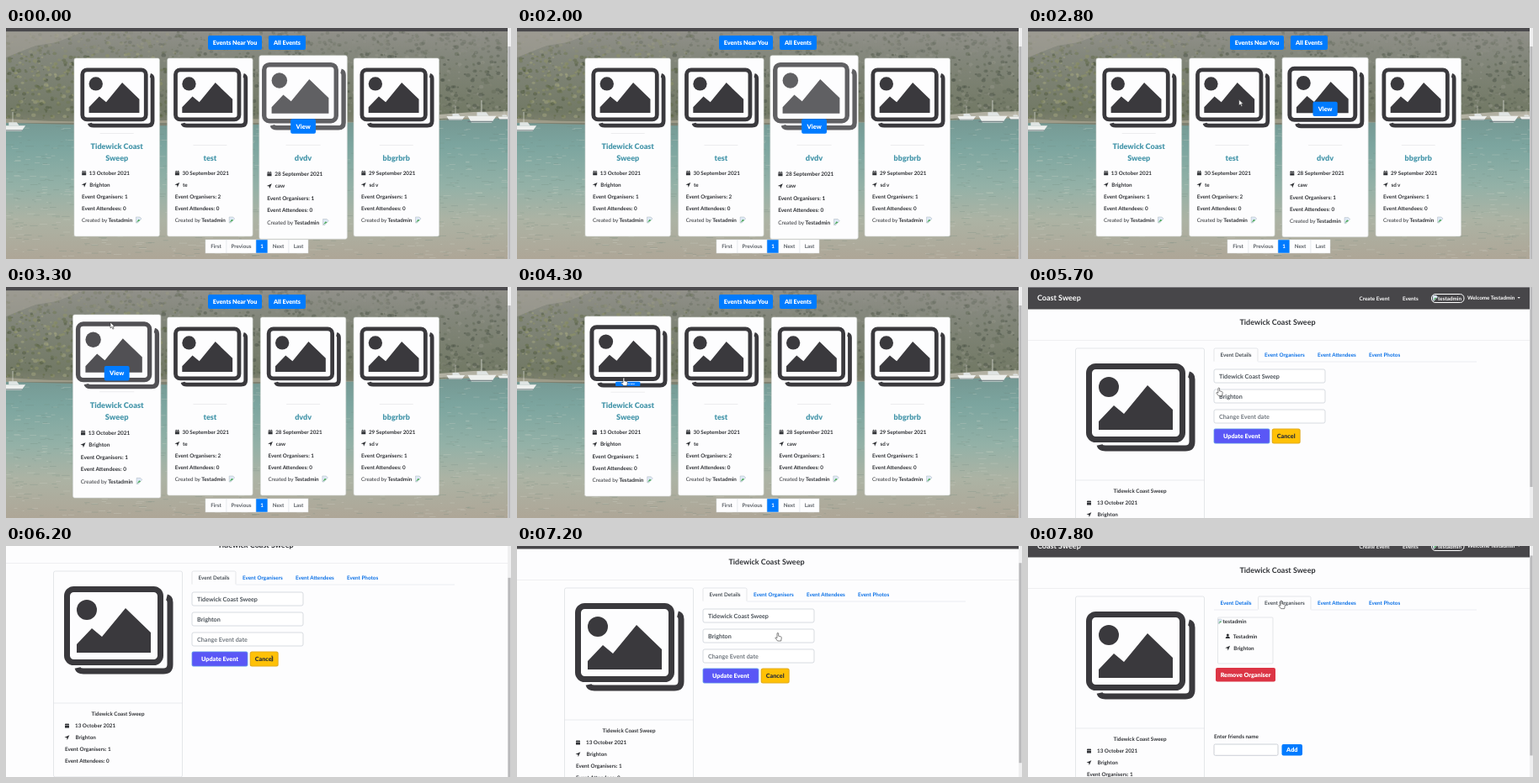
An HTML page for the animation above (8 s loop, 600 px wide and 275 px high).

```html
<!DOCTYPE html>
<html lang="en">
<head>
<meta charset="utf-8">
<title>Event listing</title>
<style>
html, body { margin: 0; width: 100%; height: 100%; overflow: hidden; background: #fdfdfe; }
svg { display: block; width: 600px; height: 275px; }
text { font-family: Lato, sans-serif; font-weight: 700; font-size: 6.3px; fill: #2f3135; text-rendering: geometricPrecision; }
.mid { font-size: 7.2px; }
.big { font-size: 9px; }
</style>
</head>
<body>
<svg id="stage" viewBox="0 0 600 275" xmlns="http://www.w3.org/2000/svg">
  <defs>
    <linearGradient id="hill" x2="0" y2="1">
      <stop offset="0" stop-color="#92918b"/><stop offset=".3" stop-color="#82867a"/>
      <stop offset=".8" stop-color="#727965"/><stop offset="1" stop-color="#88887a"/>
    </linearGradient>
    <linearGradient id="sea" x2="0" y2="1">
      <stop offset="0" stop-color="#759792"/><stop offset=".2" stop-color="#7ca59f"/>
      <stop offset=".48" stop-color="#93b1a7"/><stop offset=".72" stop-color="#acb3a4"/>
      <stop offset="1" stop-color="#aea697"/>
    </linearGradient>
    <g id="picture" fill="none" stroke="#3a393d" stroke-width="7">
      <path d="M122 13q4 1 4 6V93q0 8-8 8H23q-6 0-7-4"/>
      <rect x="3.5" y="3.5" width="111" height="87" rx="8"/>
      <g fill="#3a393d" stroke="none">
        <circle cx="27" cy="28" r="12"/>
        <path d="M15 79V69L33 50l12 10 28-34 30 29v24z"/>
      </g>
    </g>
    <g id="calendar" fill="#2f3135">
      <path d="M-2.5-1.9h5v1h-5zM-2.5-.4h5v3h-5zM-1.6-2.9h.9v1.2h-.9zM.7-2.9h.9v1.2H.7z"/>
    </g>
    <path id="arrow" d="M2.8-2.8L.3 3-.3.3-3-.2z" fill="#2f3135"/>
    <g id="person" fill="#2f3135"><circle cy="-1.4" r="1.5"/><path d="M-2.6 2.8q0-2.6 2.6-2.6t2.6 2.6z"/></g>
    <g id="broken">
      <path d="M0 0h4.5l2 2-2.5 2.5L2 7H0z" fill="#dfe9f6" stroke="#a9b4bd" stroke-width=".5"/>
      <path d="M.4 6.4L3 2.7 5 4z" fill="#4caa58"/>
    </g>
  </defs>
  <g id="listing"></g>
  <g id="detail"></g>
  <g id="bar"><rect x="596" width="4" height="275" fill="#efeff0"/><rect id="thumb" x="596.4" width="3.2" height="275" fill="#b9b9bb"/></g>
  <g id="cursor" stroke="#333" stroke-width=".6" fill="#fff">
    <path id="pointer" d="M0 0v7l1.7-1.5 1.2 2.6 1.2-.6-1.2-2.5h2.2z"/>
    <path id="hand" d="M-1-4.5q1-1 1.7 0v3.3l3 .8q.7.3.6 1.2L3.7 4.6H-.4L-3 1.3q0-1 1-.9l1 .8z"/>
    <path id="beam" d="M-1-3h2M0-3v6M-1 3h2" fill="none"/>
  </g>
</svg>
<script>
const EVENT = "Tidewick Coast Sweep", BRAND = "Coast Sweep", USER = "Testadmin";
const PLACE = "Brighton", DURATION = 8000, FRAME = 100;
const $ = id => document.getElementById(id);

const text = (x, y, s, attrs = "") => `<text x="${x}" y="${y}" ${attrs}>${s}</text>`;
const centred = (x, y, s, attrs = "") => text(x, y, s, `text-anchor="middle" ${attrs}`);
const rect = (x, y, w, h, fill, attrs = "") =>
  `<rect x="${x}" y="${y}" width="${w}" height="${h}" fill="${fill}" ${attrs}/>`;
const use = (id, x, y, scale = 1) => `<use href="#${id}" transform="translate(${x} ${y}) scale(${scale})"/>`;
const button = (x, y, w, h, fill, label, ink = "#fff") =>
  rect(x, y, w, h, fill, 'rx="2"') +
  centred(x + w / 2, y + h / 2 + 2.6, label, `class="mid" style="fill:${ink};font-weight:900"`);

function randomiser(seed) {
  return () => (seed = (seed * 16807) % 2147483647) / 2147483647;
}

function landscape() {
  const rnd = randomiser(77);
  const sunny = ["#5f6948", "#8f9366", "#6f7853", "#a3a580", "#4f5a3f"];
  const shaded = ["#565e50", "#7f8474", "#646c5a", "#93958a", "#4b5347"];
  let out = rect(0, 0, 600, 125, "url(#hill)");
  for (let i = 0; i < 2200; i++) {
    const x = rnd() * 600, y = 4 + rnd() * 104, r = .8 + rnd() * 2;
    const palette = x < 140 + rnd() * 120 ? sunny : shaded;
    const alpha = y < 30 ? .25 : .5;
    out += `<ellipse cx="${x.toFixed(1)}" cy="${y.toFixed(1)}" rx="${r.toFixed(1)}" ry="${(r * .8).toFixed(1)}" fill="${palette[i % 5]}" opacity="${alpha}"/>`;
  }
  out += '<path d="M0 5h90l-30 12-25 4-35 14z" fill="#aaa69b" opacity=".5"/>';
  out += '<path d="M0 108q80 6 190 2t200 1 210-10v12H0z" fill="#a5a18f" opacity=".85"/>';
  out += '<path d="M0 113q150 5 300 2t300-8v168H0z" fill="url(#sea)"/>';
  out += '<path d="M515 103l40-3 45-1v6l-85 3z" fill="#c2bfb2" opacity=".8"/>';
  for (let i = 0; i < 1100; i++) {
    const y = 116 + rnd() * 158, x = rnd() * 600, w = 2 + rnd() * 8;
    out += rect(x.toFixed(1), y.toFixed(1), w.toFixed(1), .8, i % 2 ? "#d3d8cc" : "#6f857c", 'opacity=".3"');
  }
  const boat = (x, y, s) => `<g transform="translate(${x} ${y}) scale(${s})">
    <path d="M-15-3H16L11 4h-22z" fill="#eef0ee"/><path d="M-15 3H12" stroke="#667479"/>
    <path d="M-5-3v-4H5l3 4z" fill="#dfe4e3"/><path d="M0-5v-15" stroke="#dedfd8" stroke-width=".7"/></g>`;
  return out + boat(565, 108, 1.1) + boat(534, 107, .7) + boat(592, 107, .5) + boat(8, 119, .95);
}

const cards = [
  [EVENT, "13 October 2021", PLACE, 1],
  ["test", "30 September 2021", "te", 2],
  ["dvdv", "28 September 2021", "caw", 1],
  ["bbgrbrb", "29 September 2021", "sd v", 1]
];

function card([name, date, place, organisers], i) {
  const x = 81 + i * 110.7, mid = x + 50.7;
  const title = 'class="big" style="fill:#4797ab;font-weight:900"';
  const words = name.split(" "), last = words.pop();
  return `<g id="card${i}">` +
    rect(x, 36, 101.4, 212, "#fdfdfe", 'rx="2" stroke="#d4d8d6" stroke-width=".6"') +
    `<g id="image${i}">${use("picture", x + 7.4, 47.4, .68)}</g>` +
    rect(mid - 20, words.length ? 125 : 139, 40, .6, "#e2e2e4") +
    centred(mid, 143.5, words.join(" "), title) + centred(mid, 157.5, last, title) +
    use("calendar", x + 11.7, 172.7) + text(x + 17.8, 175, date) +
    use("arrow", x + 11.7, 186.8) + text(x + 18.3, 189, place) +
    text(x + 9, 203.2, "Event Organisers: " + organisers) +
    text(x + 9, 217.2, "Event Attendees: 0") +
    text(x + 9, 231.2, `<tspan style="font-weight:400">Created by</tspan> ${USER}`) +
    use("broken", x + 73.5, 225) +
    `<g id="view${i}">${button(mid - 14.5, 109.2, 29, 17, "#007bff", "View")}</g></g>`;
}

function pagination() {
  const edges = [237, 262, 297, 311, 336, 359];
  return ["First", "Previous", "1", "Next", "Last"].map((label, i) => {
    const x = edges[i], w = edges[i + 1] - x, on = i === 2;
    return rect(x, 252, w, 16, on ? "#007bff" : "#fdfdfe", 'stroke="#dee2e6" stroke-width=".5"') +
      centred(x + w / 2, 262.4, label, `style="fill:${on ? "#fff" : "#5b6066"}"`);
  }).join("");
}

$("listing").innerHTML = landscape() + rect(0, 0, 600, 4, "#4b4a4d") +
  button(240, 9, 64, 17, "#007bff", "Events Near You") +
  button(312, 9, 44, 17, "#007bff", "All Events") +
  cards.map(card).join("") + pagination();

const white = 'style="fill:#fff"';
const navbar = rect(0, 0, 600, 26.5, "#474649") + rect(0, 0, 600, .8, "#8a898c") +
  text(11, 16, BRAND, `class="big" ${white}`) +
  text(393.5, 15.5, "Create Event", white) + text(445, 15.5, "Events", white) +
  rect(479.5, 8.5, 38.5, 10, "none", 'rx="4.5" stroke="#fff"') +
  use("broken", 481, 10, .9) + text(487, 15.5, USER.toLowerCase(), white) +
  text(522, 15.2, "Welcome " + USER, white) + '<path d="M581.5 12h3.4l-1.7 1.8z" fill="#fff"/>';

const line = 'stroke="#d9dce0" stroke-width=".7"';
const summary = centred(296.5, 45.3, EVENT, 'class="big"') + rect(0, 63.3, 596, .6, "#e6e6e9") +
  rect(56.5, 73, 153, 245, "none", `rx="2" ${line}`) + rect(56.5, 229.7, 153, .6, "#d9dce0") +
  use("picture", 69, 91) + centred(133, 244.8, EVENT) +
  use("calendar", 72.5, 257) + text(82, 259.3, "13 October 2021") +
  use("arrow", 72.5, 271) + text(82.5, 273.3, PLACE) +
  text(70, 287.3, "Event Organisers: 1") + text(70, 301.3, "Event Attendees: 0");

const tabs = [["Details", 228.5], ["Organisers", 281], ["Attendees", 344], ["Photos", 405]];
function tabRow(active) {
  const [x, w] = [[221, 52], [273.5, 62.5]][active];
  return rect(221, 88.7, 312, .6, "#dee2e6") +
    rect(x, 73, w, 16.5, "#fdfdfe", `rx="1.5" ${line}`) + rect(x - .4, 88.4, w + .8, 2, "#fdfdfe") +
    tabs.map(([name, tx], i) =>
      text(tx, 82.8, "Event " + name, `style="fill:${i === active ? "#495057" : "#0a70e6"}"`)).join("");
}

const field = (y, value, ink) => rect(221, y, 132, 16, "#fff", `rx="2" stroke="#cdd2d8" stroke-width=".8"`) +
  text(227, y + 10.6, value, `class="mid" style="fill:${ink}"`);
const detailsPane = tabRow(0) + field(98, EVENT, "#495057") + field(122, PLACE, "#495057") +
  field(146, "Change Event date", "#70777e") +
  rect(220.6, 168.6, 66.8, 17.8, "#69a0e8", 'rx="2"') + button(221.3, 169.3, 65.4, 16.4, "#5a57f6", "Update Event") +
  rect(289.7, 168.6, 34, 17.8, "#e3ad20", 'rx="2.5"') + button(290.7, 169.5, 32, 16, "#ffc107", "Cancel", "#2f3135");

const organisersPane = tabRow(1) + rect(225.5, 98, 65.5, 55, "none", `rx="1" ${line}`) +
  use("broken", 226, 100, .8) + text(231.5, 105.2, USER.toLowerCase()) +
  use("person", 237.3, 120.3) + text(243.7, 122.5, USER) +
  use("arrow", 237.3, 134.5) + text(244.3, 136.5, PLACE) +
  button(223, 158, 71, 16.5, "#dc3545", "Remove Organiser") +
  text(221, 242.4, "Enter friends name") +
  rect(221, 249, 76, 13.3, "#fff", 'rx="1.5" stroke="#bfc5cc" stroke-width=".8"') +
  button(301.5, 249, 24.5, 13.5, "#007bff", "Add");

$("detail").innerHTML = rect(0, 0, 600, 360, "#fdfdfe") + navbar +
  `<g id="content">${summary}<g id="details">${detailsPane}</g><g id="organisers">${organisersPane}</g></g>`;

// Tables of [time, value...]; values are linear between rows.
const tracks = {
  grow0: [[2900, 0], [3300, .95], [3500, 1], [4100, 1], [4300, .35], [4400, .35]],
  fade0: [[3100, 0], [3300, .6], [3500, 1], [4100, 1], [4300, 0]],
  shift0: [[3000, -28], [3300, -13.8], [3600, 0], [4100, 0], [4300, -2]],
  squash0: [[3000, 0], [3100, 1], [4100, 1], [4300, .3], [4400, .3]],
  grow2: [[2500, 1], [2900, 0]],
  fade2: [[2500, 1], [2800, 0]],
  shift2: [[2500, 0], [2900, -28]],
  squash2: [[2800, 1], [2900, 0]],
  scroll: [[5900, 0], [6200, 43], [7000, 43], [7300, 13]],
  cursor: [[2400, 352, 120], [3300, 124, 42], [3700, 127, 90], [4300, 127, 113], [4800, 134.5, 113],
    [5300, 134.5, 113], [5800, 250, 128], [6200, 316, 134], [7000, 316, 134], [7500, 301, 70]]
};

function sample(rows, t) {
  const next = rows.findIndex(row => row[0] > t);
  if (next < 0) return rows[rows.length - 1].slice(1);
  if (next === 0) return rows[0].slice(1);
  const a = rows[next - 1], b = rows[next], k = (t - a[0]) / (b[0] - a[0]);
  return a.slice(1).map((v, i) => v + (b[i + 1] - v) * k);
}

const show = (id, on) => $(id).style.display = on ? "" : "none";
const zoom = (x, y, sx, sy = sx) => `translate(${x} ${y}) scale(${sx} ${sy}) translate(${-x} ${-y})`;

function hover(i, t) {
  const [grow, fade, shift, squash] = ["grow", "fade", "shift", "squash"].map(n => sample(tracks[n + i], t)[0]);
  const mid = 131.7 + i * 110.7;
  $("card" + i).setAttribute("transform", zoom(mid, 142, 1 + .03 * grow));
  $("image" + i).setAttribute("transform", zoom(mid, 82, 1 + .1 * grow));
  $("image" + i).setAttribute("opacity", 1 - .2 * fade);
  $("view" + i).setAttribute("transform", `translate(0 ${shift}) ` + zoom(mid, 117.7, 1, squash));
  show("view" + i, squash > 0);
}

function render(time) {
  const t = Math.floor((time % DURATION) / FRAME) * FRAME;
  const onListing = t < 4500;
  show("listing", onListing);
  show("detail", !onListing);
  show("content", t >= 5100);
  show("details", t < 7500);
  show("organisers", t >= 7500);
  show("bar", onListing || t >= 5100);
  hover(0, t);
  hover(2, t);

  const [scroll] = sample(tracks.scroll, t);
  $("detail").setAttribute("transform", `translate(0 ${-scroll})`);
  $("thumb").setAttribute("y", onListing ? 22 : scroll * .88);
  $("thumb").setAttribute("height", onListing ? 253 : 238);

  const [x, y] = sample(tracks.cursor, t);
  $("cursor").setAttribute("transform", `translate(${x} ${y})`);
  show("cursor", t >= 2500);
  const beam = t >= 6000 && t < 7100;
  show("pointer", t < 4000);
  show("hand", t >= 4000 && !beam);
  show("beam", beam);
}

show("view1", false);
show("view3", false);
const start = performance.now();
function tick() {
  render(performance.now() - start);
  requestAnimationFrame(tick);
}
tick();
</script>
</body>
</html>
```
